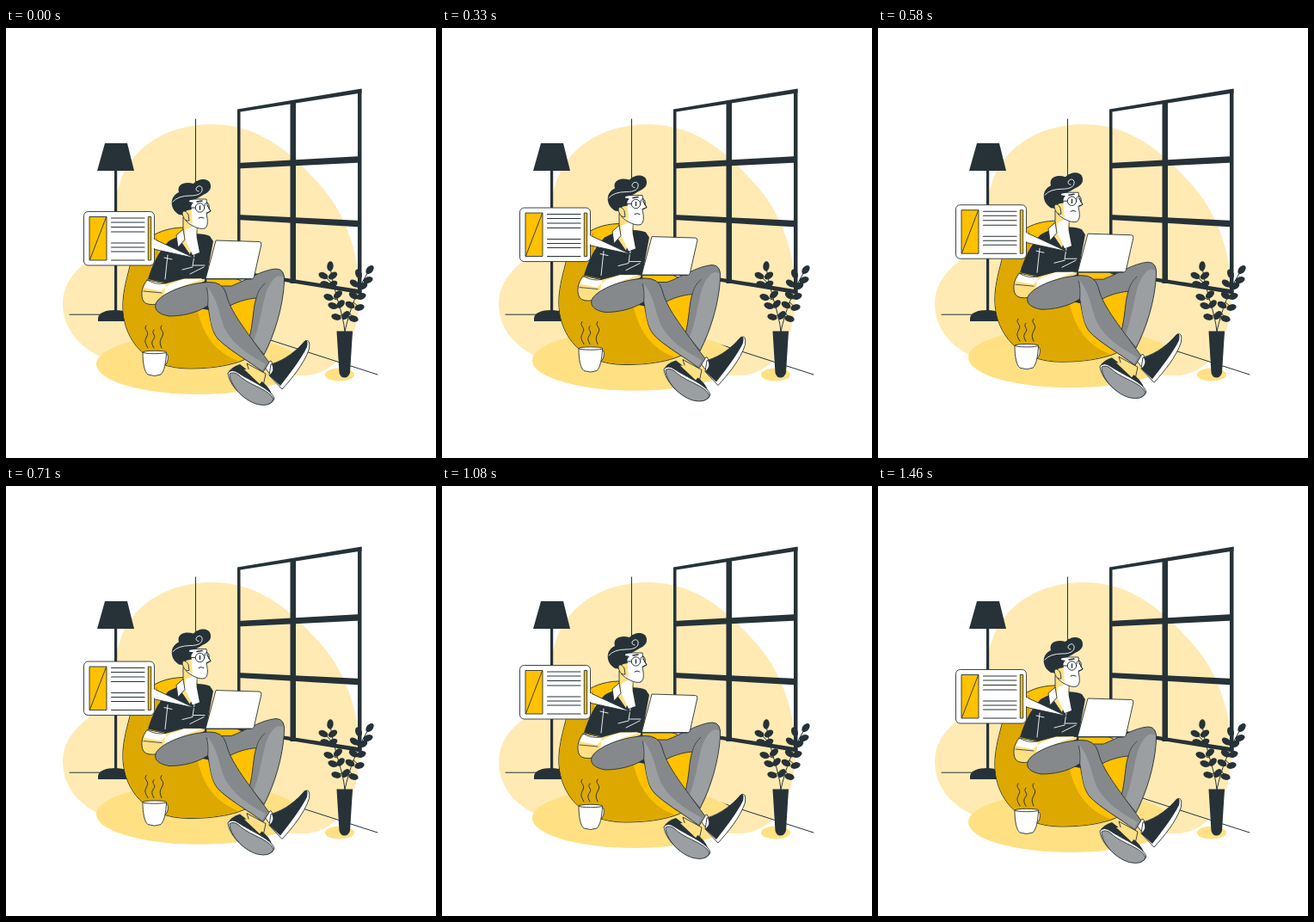
These frames come from a looping animation (500x500 px, 1500 ms). An HTML page:

```html
<!DOCTYPE html>
<html lang="en">
<head>
<meta charset="utf-8">
<title>Reading in a beanbag</title>
<style>
  html, body { margin: 0; width: 100%; height: 100%; overflow: hidden; background: #fff; }
  svg { display: block; width: 100%; height: 100%; }
  .ink { fill: #263238; }
  .line { fill: none; stroke: #263238; stroke-linecap: round; }
  .edge { stroke: #263238; stroke-width: .9; stroke-linejoin: round; }
  .white { fill: #fff; }
  .chalk { fill: none; stroke: #fff; stroke-width: .9; stroke-linecap: round; }
  .gold { fill: #ffc100; }
  .ochre { fill: #dda800; }
  .pale { fill: #ffe083; }
  .grey { fill: #86898b; }
  .light { fill: #9b9fa1; }
</style>
</head>
<body>
<svg viewBox="0 0 500 500">
  <path fill="#ffeab3" d="M66 320C67 290 88 277 104 262C126 242 122 216 130 188C142 140 185 112 240 112C300 112 338 152 368 186C395 217 410 262 411 305C412 365 385 404 345 404C300 404 280 400 200 400C130 400 66 375 66 320Z"/>
  <path class="line" d="M220.5 106V240M74 333.200H140M300 360.500L432 403"/>

  <g id="lamp" class="ink">
    <path d="M115 134H141L149 166H106Z"/>
    <path d="M126 166H129.200V330H126Z"/>
    <path d="M107 341V338C107 331 116 328 127 328S147 331 147 341Z"/>
  </g>

  <g id="window" class="ink">
    <path d="M269 94.500L413.500 70.500V75.500L269 98Z"/>
    <path d="M269 95H272.500V285H269ZM330.500 85L337 84V297H330.500ZM409 72L413.500 71V309H409Z"/>
    <path d="M269 157L413 149V156.500L269 163.500ZM269 217L413 224V231.500L269 223Z"/>
    <path d="M269 282L413.500 304.500V309.500L269 286Z"/>
  </g>

  <g id="plant">
    <ellipse class="pale" cx="388" cy="403" rx="17" ry="7.500"/>
    <path class="line" d="M394 353C392 330 381 308 377 278M394 353C399 330 408 305 422 282M390 334L384 336M385 316L376 313M381 299L370 288M400 332L404 338M404 319L411 325M410 303L405 297"/>
    <g id="leaves" class="ink"></g>
    <path class="ink" d="M384.500 352.500H403L400 401Q398 406.500 393.500 406.500T387.500 401Z"/>
  </g>

  <g id="floating">
    <ellipse class="pale" cx="224" cy="391" rx="119" ry="35"/>

    <g id="beanbag">
      <path class="gold edge" d="M210 232C178 231 150 247 142 285C138 300 135 315 136 329C138 362 162 396 213 396C250 396 285 389 298 370C312 350 318 320 300 305L240 280Z"/>
      <path class="ochre" d="M176 243C155 253 147 270 142.500 286C138 302 136 316 136.500 329C139 362 163 395.500 213 395.500C240 395.500 258 392 270 387C248 379 229 361 222 325L180 300Z"/>
    </g>

    <g id="mug">
      <path class="line" d="M163 346c-4 5 4 6 1 12s-3 7 1 14M172 351c-4 4 3 6 0 10s-3 6 0 11M181 346c-4 5 4 6 1 12s-4 7-1 14"/>
      <path class="white edge" d="M183 378C189 376 190 385 186 391L180 395Z"/>
      <path class="white edge" d="M159 377C159 390 161 400 165 403Q173 406 180 403C184 399 186 390 186.500 377Z"/>
      <ellipse class="white edge" cx="172.800" cy="377" rx="13.800" ry="1.700"/>
    </g>

    <g id="far-leg">
      <path class="grey edge" d="M238 300L262 300C278 294 298 281 314 280Q325 280 323.500 296C322 325 312 357 300 380L283 360C288 340 287 326 291 314C280 315 268 318 255 326Z"/>
      <path class="light" d="M323 290C322 325 311 356 300 378L288 364C299 335 298 308 309 295Q315 285 323 290Z"/>
      <path class="line" stroke-width=".7" d="M291 314Q293 304 301 297"/>
    </g>

    <g id="far-shoe">
      <path class="pale edge" d="M280 390L302 402L299 416L285 406Z"/>
      <path class="ink" d="M258 401Q262 394 272 391L290 405L300 413Q309 421 310 430L270 412Z"/>
      <path class="pale" d="M277 397L285 397L299 409L295 414Z"/>
      <path class="white edge" d="M258 401Q263 396 270 401C285 411 309 420 312 431Q309 440 294 437C275 433 259 414 258 401Z"/>
      <path class="light edge" d="M260 402Q265 399 271 404C283 416 307 420 311 432Q307 441 292 437.500C274 432 260 414 260 402Z"/>
    </g>

    <g id="near-shoe">
      <path class="white edge" d="M299 392L308 387L314 397L308 404Z"/>
      <path class="white edge" d="M308 391C325 386 338 375 348 364Q354 361 352.500 373C347 390 332 408 321 420L306 404Z"/>
      <path class="ink" d="M309 391C325 386 338 375 347 364Q352 361 350 371C343 385 330 402 319 416L306 404Q313 398 309 391Z"/>
    </g>

    <g id="torso">
      <path class="ink" d="M189 248C200 241 225 236 237 242L241 248L233 290L236 328L205 322L184 296L165 292C170 276 177 260 189 248Z"/>
      <path class="pale edge" d="M206 220L206 235L199 242L214 264L222 242L222 226Z"/>
      <path class="white" d="M209 234L222 229L221 240L225 261L217 264L208 245Z"/>
      <path class="white edge" d="M206 234L198 241L200 255L208 246Z"/>
      <path class="chalk" d="M188 264L185 292M184 267L193 269M219 264L217 277M218 276H231M205 281L217 278M214 286L230 278"/>
      <path class="pale edge" d="M164 293C158 300 156 311 160 318Q164 323 176 321L206 304L231 295L232 291L207 291L185 297Z"/>
      <path class="white" d="M165 293.500L160 302L180 306L190 298L207 292L231 291.500L213 297L184 310L186 298Z"/>
      <path class="line" stroke-width=".8" d="M164 293Q174 299 185 297M160 306L181 308"/>
    </g>

    <path class="white edge" d="M244 247L294.500 248.500Q297.500 248.800 296.800 252L288.500 289Q288 292 285 292H232Z"/>
    <path class="line" stroke-width=".9" d="M228 291.500H285"/>

    <g id="near-leg">
      <path class="grey edge" d="M174 321C177 311 205 297 236 295.500Q252 295 256 309C261 330 276 348 306 389L299 400C280 386 257 373 246 361C238 351 238 338 234.500 323C221 332 203 335 190 335C178 333 172 328 174 321Z"/>
      <path class="light" d="M235 315C237 336 238 350 246 360C257 372 280 385 298 398L302 391C281 379 267 370 257 354C248 340 249 320 235 302Z"/>
      <path class="line" stroke-width=".7" d="M234.500 323Q236 310 233 302"/>
    </g>

    <g id="head">
      <path class="white edge" d="M206 207L214 199L233 199L234 206L238 213L233 216C235 224 235 231 231 233C224 235 214 229 209 224Z"/>
      <path class="pale" d="M206 207L215 205L217 228L209 223Z"/>
      <path class="ink" d="M201 217C190 210 190 196 201 191C198 181 209 178 218 181C223 175 237 173 238 183C239 191 230 193 226 196C219 201 212 199 213 202L218 203Q214 206 216 211L211 212Q208 212 209 218Z"/>
      <path class="chalk" d="M194 202Q200 195 214 195C224 195 229 192 228 186Q226 182 222 185Q219 189 224 190"/>
      <path class="pale edge" d="M212 217C208 210 203 213 206 219Q208 225 213 224Z"/>
      <g class="line">
        <circle cx="225.500" cy="209" r="5.200"/>
        <path d="M231 207Q231 203 234 203Q237 205 236 210M215 209H220"/>
        <path stroke-width="1.500" d="M222 202L228 201M225.500 207V211"/>
        <path d="M224 221Q227 219 230 221M234 206L238 213L233 215"/>
      </g>
    </g>

    <g id="card">
      <path class="white edge" d="M171 245L219.500 267.500L171 257Z"/>
      <rect class="white edge" x="90.500" y="213.500" width="82" height="62.500" rx="5"/>
      <rect class="gold edge" x="97" y="219.500" width="20" height="50.500"/>
      <path class="line" stroke-width=".9" d="M116.500 220L97.500 269.500"/>
      <path class="line" stroke-width="1.100" d="M122.500 221H161M122.500 226H161M122.500 231.500H161M122.500 237H161M122.500 250H161M122.500 255H161M122.500 260H161M122.500 270H161"/>
      <rect class="gold edge" x="165.300" y="219.500" width="3.400" height="50.500"/>
      <path class="white" d="M169.500 246H174V256H169.500Z"/>
    </g>
  </g>
</svg>
<script>
  // Leaf centre and tilt in degrees.
  const leaves = [
    [377, 277, 95], [369, 288, 25], [380, 288, -35], [371, 298, 15], [380, 298, -30],
    [375, 313, 20], [386, 310, -40], [380, 323, 20], [389, 321, -45], [384, 336, 15],
    [395, 334, -50], [423, 281, -50], [410, 286, 70], [421, 293, -20], [405, 297, 35],
    [415, 300, -30], [404, 311, 35], [413, 312, -20], [400, 322, 30], [411, 325, -15], [404, 338, 15]
  ];
  document.getElementById("leaves").innerHTML = leaves.map(([x, y, tilt]) =>
    `<ellipse rx="5.800" ry="3.700" transform="translate(${x} ${y}) rotate(${tilt})"/>`).join("");

  const LOOP = 1500, STEPS = 36, LIFT = 10;
  const floating = document.getElementById("floating");
  const start = performance.now();

  // Linear rise and fall, shown at 24 steps per second.
  function draw() {
    const time = (performance.now() - start) % LOOP;
    const step = Math.floor(time / LOOP * STEPS + .15) % STEPS;
    const phase = (step + .5) / STEPS;
    const rise = LIFT * (1 - Math.abs(1 - 2 * phase));
    floating.setAttribute("transform", `translate(0 ${(.28 - rise).toFixed(2)})`);
    requestAnimationFrame(draw);
  }
  draw();
</script>
</body>
</html>
```
